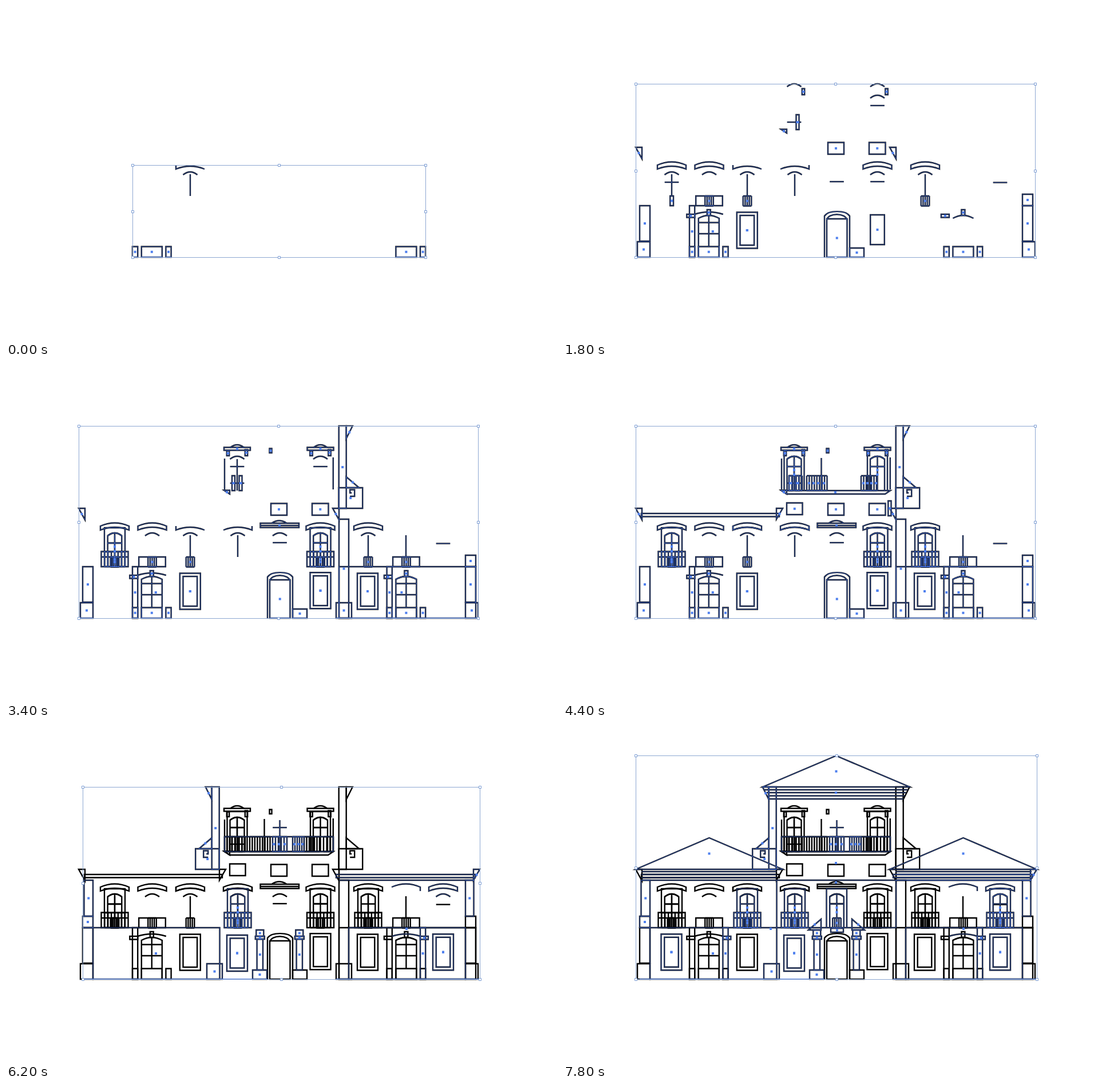
These frames come from a looping animation (963x582 px, 8 s). An HTML page:

```html
<!DOCTYPE html>
<html lang="en">
<head>
<meta charset="utf-8">
<title>Facade assembly</title>
<style>
html, body { margin: 0; width: 100%; height: 100%; overflow: hidden; background: #fff; }
svg { display: block; width: 963px; height: 582px; }
path { fill: none; stroke-miterlimit: 10; }
#ink path { stroke: #000; stroke-width: 2.4; }
#outline path { stroke: #4f80ff; stroke-width: 1.1; stroke-opacity: .6; }
#outline .base { stroke: #5079d8; stroke-width: 2; stroke-opacity: .9; }
#outline .mark { fill: #4f80ee; stroke: none; }
#frame { stroke: #8ea8d2; stroke-width: 1; }
#handles { fill: #fff; stroke: #7f9fd4; stroke-width: 1; }
</style>
</head>
<body>
<svg viewBox="0 0 963 582">
  <g id="ink"></g>
  <g id="outline"></g>
  <path id="frame"/>
  <path id="handles"/>
</svg>
<script>
const STEP = 200, STEPS = 40, DESELECT = 24;
const NS = 'http://www.w3.org/2000/svg';
const $ = id => document.getElementById(id);
const parts = [];
let queue = [];

const make = (tag, parent) => parent.appendChild(document.createElementNS(NS, tag));
const path = (d, parent, cls) => {
  const el = make('path', parent);
  el.setAttribute('d', d);
  if (cls) el.setAttribute('class', cls);
  return el;
};

// Queue a shape; marks are the centre points shown while selected.
function add(d, marks = [], base = '') {
  const part = { d, marks, base, end: Infinity };
  queue.push(part);
  return part;
}
// Spread the queued shapes evenly over a range of steps.
function flush(from, to) {
  queue.forEach((p, i) => p.step = from + Math.floor(i * (to - from + 1) / queue.length));
  parts.push(...queue);
  queue = [];
}

const box = (a, b, c, d) => `M${a},${b}H${c}V${d}H${a}Z`;
const rect = (a, b, c, d) =>
  add(box(a, b, c, d), [[(a + c) / 2, (b + d) / 2]], d === 439 ? `M${a},439H${c}` : '');
const tri = (a, b, c, d, e, f) => {
  const mid = (p, q, r) => (Math.min(p, q, r) + Math.max(p, q, r)) / 2;
  return add(`M${a},${b}L${c},${d}L${e},${f}Z`, [[mid(a, c, e), mid(b, d, f)]]);
};
const arc = (x, y, half, rise) => add(`M${x - half},${y}q${half},${-2 * rise} ${2 * half},0`);
const bar = (x, y) => add(`M${x - 12.3},${y}h24.6`);
const post = (x, y1, y2) => add(`M${x},${y1}V${y2}`);
const lines = (x1, x2, ...ys) => add(ys.map(y => `M${x1},${y}H${x2}`).join(''));
const slats = (x1, x2, y1, y2, n, marks) => {
  let d = '';
  for (let i = 0; i <= n; i++) d += `M${x1 + (x2 - x1) * i / n},${y1}V${y2}`;
  return add(d + `M${x1},${y1}H${x2}M${x1},${y2}H${x2}`, marks || [[(x1 + x2) / 2, (y1 + y2) / 2]]);
};

// Main floor windows
const hood = x => add(`M${x - 25},285v-7q25,-11 50,0v7q-25,-10 -50,0Z`);
const hoodLeft = x => add(`M${x - 25},278v7q25,-10 50,0`);
const hoodRight = x => add(`M${x - 25},285q25,-10 50,0v-7`);
const brow = x => arc(x, 295, 12.5, 5);
const mullion = x => post(x, 294, 332);
const spindles = x => slats(x - 7.3, x + 7.3, 332, 349.5, 4);
const casing = x => add(`M${x - 18},349V281H${x + 18}V349`);
const panes = x => {
  add(`M${x - 12.3},349V295q12.3,-10 24.6,0V349`, [[x, 314]]);
  add(`M${x},291V349M${x - 12.3},307.5h24.6`, [[x, 322]]);
};
const balcony = x => {
  add(box(x - 23.5, 322.5, x + 23.5, 349) + `M${x - 23.5},332H${x + 23.5}`);
  slats(x - 17.6, x + 17.6, 323, 349, 6, [[x, 336]]);
  spindles(x);
};
const fullWindow = x => { casing(x); panes(x); balcony(x); };
const lowRail = x => { add(box(x - 23.3, 332, x + 23.3, 349)); spindles(x); };

// Top floor windows
const lintel = x => rect(x - 23, 140.5, x + 23, 145.5);
const bracket = (x, s) => rect(x + s * 16 - 2.2, s < 0 ? 146.5 : 144.5, x + s * 16 + 2.2, 155);
const topPanes = x => {
  add(`M${x - 17.5},216V146H${x + 17.5}V216`);
  add(`M${x - 12.5},216V161q12.5,-10 25,0V216`, [[x, 180]]);
  add(`M${x},157V216M${x - 12.5},174h25`, [[x, 188]]);
};

// Ground floor
const plinth = (x, s) => rect(x + s * 29.2 - 4.6, 420.5, x + s * 29.2 + 4.6, 439);
const pier = (x, s) => rect(x + s * 29.2 - 4.6, 349, x + s * 29.2 + 4.6, 439);
const impost = (x, s) => rect(x + s * 31.5 - 7, 364, x + s * 31.5 + 7, 369.5);
const keystone = x => rect(x - 3, 356, x + 3, 366);
const sill = x => rect(x - 18, 420.5, x + 18, 439);
const leaves = x => {
  add(`M${x - 18},439V371q18,-10 36,0V439`);
  add(`M${x},366V420M${x - 18},378.5h36M${x - 18},398h36`, [[x + (x > 480 ? -8 : 7), 394]]);
};
const opening = (x, y) => rect(x - 12.3, y - 26, x + 12.3, y + 26);
const surround = (x, y) => rect(x - 18, y - 31.5, x + 18, y + 31.5);

// Tower side: s = 1 right, -1 left
const tower = s => {
  const X = v => 477.2 + s * v;
  tri(X(117.5), 103, X(128.5), 103, X(117.5), 125);
  rect(X(104.5), 103, X(117.5), 247);
  tri(X(117.5), 192, X(140), 211, X(117.5), 211);
  add(box(X(104.5), 211, X(146), 247), [[X(125), 229]]);
  add(`M${X(124)},226H${X(132)}V214.5H${X(124)}V220H${X(127)}`);
};

const LD = 254.8, RD = 699.4;

plinth(LD, -1); sill(LD); plinth(LD, 1); sill(RD); plinth(RD, 1);
hoodLeft(322); brow(322); mullion(322);
flush(0, 0);

plinth(RD, -1); impost(RD, -1); keystone(RD); arc(RD, 371, 18, 5);
rect(501, 423, 526, 439); rect(461, 372, 496.5, 439);
add('M461,374C464,361 493,361 496.5,374');
add('M457,439V367C464,356.5 494,356.5 501,367V439');
opening(549.5, 391); spindles(633); mullion(633); brow(633); hood(633);
bar(549.5, 307); brow(549.5); hood(549.5); brow(255.5); hood(255.5);
rect(463, 238.5, 491, 259); rect(535, 238.5, 563.5, 259);
tri(571, 247, 582, 247, 582, 267); tri(127, 247, 138, 247, 138, 267);
bar(404, 203); rect(407.5, 190, 412.5, 216); tri(381, 215.5, 391, 215.5, 391, 222);
bar(549.5, 174); arc(549.5, 161, 12.5, 5); bracket(549.5, 1); arc(549.5, 141, 12.5, 5);
bracket(404, 1); arc(404, 141, 12.5, 5);
flush(1, 5);

rect(803, 412, 825, 439); rect(803, 349, 821, 411); rect(803, 329, 821, 349);
rect(130, 412, 152, 439); rect(134, 349, 152, 411);
pier(LD, -1); impost(LD, -1); keystone(LD); arc(LD, 364, 25, 4); leaves(LD);
opening(321.8, 392); surround(321.8, 392);
lowRail(255.5); spindles(322); rect(187.2, 332, 193, 349);
mullion(190); bar(190, 308); brow(190); hood(190);
hoodRight(405); brow(405); mullion(405); bar(764, 308.5);
bar(478.5, 307); brow(478.5);
add(box(444.5, 273, 512, 280.5) + 'M444.5,277H512', [[478, 277]]);
arc(477.5, 272.5, 12.5, 4);
tower(1);
post(382, 160, 215); post(571.8, 158, 214);
rect(395, 190, 400, 216); post(404, 161, 216); bar(404, 174); arc(404, 161, 12.5, 5);
bracket(404, -1); lintel(404); bracket(549.5, -1); lintel(549.5);
rect(460.5, 142.5, 464.5, 150);
flush(6, 12);

pier(RD, -1); leaves(RD); opening(632, 392); surround(632, 392); surround(549.5, 390.7);
rect(577, 412, 604, 439); rect(582, 266, 599, 439);
add(box(582, 349, 821, 439), [], 'M577,439H825');
lowRail(RD); mullion(699);
fullWindow(190); fullWindow(549.5); fullWindow(633);
hood(322); hood(405);
tri(373, 247, 384, 247, 373, 266);
add(box(137, 256, 378, 261.5));
rect(391, 237.5, 418.5, 258);
rect(568.3, 234, 573.5, 260).end = DESELECT;
add('M382,216H572L563,222H391Z', [[476, 219]]);
topPanes(404); topPanes(549.5);
slats(395, 418, 190, 216, 4, [[398, 203], [411, 203]]);
slats(426, 461.5, 190, 216, 8, [[430, 203], [438, 203], [446, 203], [456, 203]]);
slats(521, 548, 190, 216, 6, [[525, 203], [532, 203], [539, 203], [547, 203]]);
post(451.5, 159, 216);
flush(13, 22);

slats(382, 395, 190, 216, 3); slats(555, 572, 190, 216, 3);
flush(23, 23);

slats(466, 491, 190, 216, 5, [[468, 203], [477, 203], [487, 203]]);
slats(501, 521, 190, 216, 5, [[504, 203], [511, 203], [518, 203]]);
post(478.5, 161, 216); bar(478.5, 174);
add(box(382, 190, 572, 216));
tower(-1);
flush(24, 25);

pier(RD, 1); impost(RD, 1); arc(RD, 364, 25, 4);
add(box(599, 349, 803, 439), [[700, 351]], 'M577,439H828');
opening(764, 391.7); surround(764, 391.7);
hood(764); brow(764); add('M674,278q25,-11 50,0v7');
tri(817, 247, 828, 247, 817, 266);
add(box(577, 256, 820, 261.5) + 'M582,266H818');
rect(803, 266, 817.5, 329);
for (const s of [-1, 1]) {
  const c = 478.3 + s * 34.5;
  rect(c - 5.2, 369, c + 5.2, 423);
  rect(c - 8, 364, c + 8, 369);
  rect(c - 6.5, 353, c + 6.5, 364);
}
rect(431, 423, 456, 439);
opening(404, 393.5); surround(404, 393.5);
fullWindow(405);
rect(351, 412, 378, 439);
add(box(152, 349, 373.5, 439) + 'M134,349H152', [[262, 394]], 'M134,439H431');
rect(136.5, 266, 152, 329); rect(134, 329, 152, 349);
flush(26, 31);

pier(LD, 1); impost(LD, 1);
opening(189.5, 391.7); surround(189.5, 391.7);
fullWindow(322);
for (const x of [255.5, 699.5]) tri(x - 128.5, 247, x, 192, x + 128.5, 247);
tri(349, 103, 477.3, 48.5, 606, 103);
fullWindow(764);
tri(429, 353, 451, 334, 451, 353); tri(505, 334, 527, 353, 505, 353);
rect(468, 350, 490, 357);
add('M460.5,349V281H496V349', [[477, 270]]); panes(478.5); spindles(478.5);
add(box(373.5, 266, 582, 349), [[363, 351], [477, 236]]);
lines(137, 373, 251, 256, 261.5, 266);
lines(581, 819, 251, 256, 261.5, 266);
lines(352, 603, 108);
lines(355, 600, 113);
lines(358, 597, 118.5);
add('M360,124H595', [[477, 113]]);
flush(32, 39);

for (const p of parts) {
  p.ink = path(p.d, $('ink'));
  p.bounds = p.ink.getBBox();
  p.glow = make('g', $('outline'));
  path(p.d, p.glow);
  if (p.base) path(p.base, p.glow, 'base');
  for (const [x, y] of p.marks) path(box(x - 2, y - 2, x + 2, y + 2), p.glow, 'mark');
}

function drawFrame(selected) {
  const edge = (pick, value) => Math.round(pick(...selected.map(p => value(p.bounds))) - .2) + .5;
  const x1 = edge(Math.min, b => b.x), x2 = edge(Math.max, b => b.x + b.width);
  const y1 = edge(Math.min, b => b.y), y2 = edge(Math.max, b => b.y + b.height);
  $('frame').setAttribute('d', box(x1, y1, x2, y2));
  let d = '';
  for (const i of [0, .5, 1]) for (const j of [0, .5, 1]) {
    if (i === .5 && j === .5) continue;
    const x = Math.floor(x1 + (x2 - x1) * i) + .5, y = Math.floor(y1 + (y2 - y1) * j) + .5;
    d += box(x - 2, y - 2, x + 2, y + 2);
  }
  $('handles').setAttribute('d', d);
}

let shown = -1;
function render(ms) {
  const step = Math.floor(ms / STEP) % STEPS;
  if (step === shown) return;
  shown = step;
  const selected = parts.filter(p => {
    const on = p.step <= step && step < p.end;
    const sel = on && (step < DESELECT || p.step >= DESELECT);
    p.ink.style.display = on ? '' : 'none';
    p.glow.style.display = sel ? '' : 'none';
    return sel;
  });
  drawFrame(selected);
}

const start = performance.now();
function tick() {
  render(performance.now() - start);
  requestAnimationFrame(tick);
}
tick();
</script>
</body>
</html>
```
